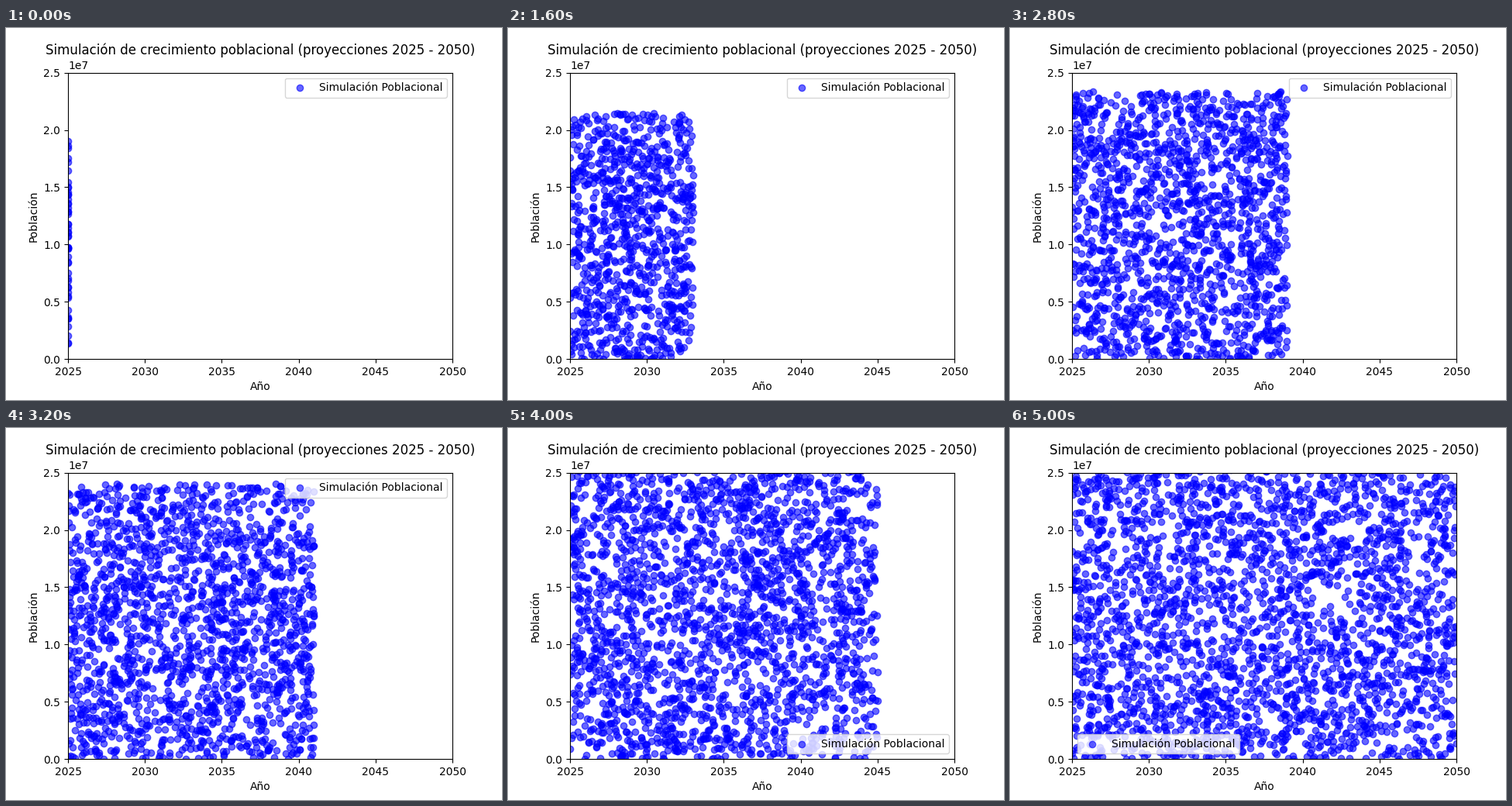
Write a matplotlib script that moves like this. It is 640 px wide and 480 px high and loops after 5.2 s.

```python
import numpy as np
import matplotlib.pyplot as plt
from matplotlib.animation import FuncAnimation

START, END = 2025, 2050
BASE, RATE = 1.915e7, 0.0143
FIRST_DOTS, PER_YEAR = 50, 110

fig, ax = plt.subplots(figsize=(6.4, 4.8), dpi=100)
ax.set_xlim(START, END)
ax.set_ylim(0, 2.5e7)
ax.set_title("Simulación de crecimiento poblacional (proyecciones 2025 - 2050)")
ax.set_xlabel("Año")
ax.set_ylabel("Población")
dots = ax.scatter([], [], color="blue", alpha=0.6, label="Simulación Poblacional")
legend = ax.legend(loc="upper right")


def sample(step):
    """Random dots spread over the elapsed years and the projected total."""
    rng = np.random.default_rng(100 + step)
    n = FIRST_DOTS + PER_YEAR * step
    total = BASE * (1 + RATE) ** step
    return np.column_stack([rng.uniform(START, START + step, n),
                            rng.uniform(0, total, n)])


def legend_place(year):
    """Move the legend away once the dots fill its corner."""
    if year < 2043:
        return "upper right"
    return "lower right" if year < END else "lower left"


def update(step):
    dots.set_offsets(sample(step))
    legend.set_loc(legend_place(START + step))
    return dots, legend


anim = FuncAnimation(fig, update, frames=END - START + 1, interval=200,
                     repeat=True, repeat_delay=0, blit=False)
plt.show()
```
